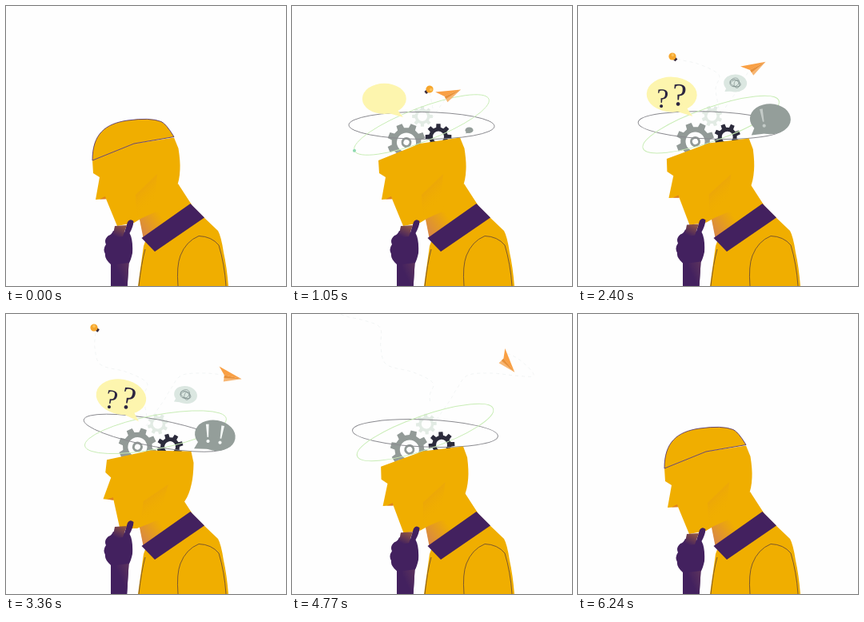
These frames come from a looping animation (350 px wide and 350 px high, 6.27 s). An HTML page:

```html
<!DOCTYPE html>
<html lang="en">
<head>
<meta charset="utf-8">
<title>Thinking</title>
<style>
  html, body { margin: 0; width: 100%; height: 100%; overflow: hidden; background: #fefefe; }
  svg { display: block; width: 100vw; height: 100vh; }
  text { font-family: "Liberation Serif", "Noto Serif", serif; text-anchor: middle; }
  .line { fill: none; stroke: #5f4238; stroke-width: .8; }
  .trail { fill: none; stroke: #eef1f1; stroke-width: .8; stroke-dasharray: 4 4; }
</style>
</head>
<body>
<svg viewBox="0 0 350 350">
  <defs>
    <linearGradient id="neckShade" gradientUnits="userSpaceOnUse" x1="168" y1="280" x2="194" y2="262">
      <stop stop-color="#d98844"/><stop offset="1" stop-color="#f0ae00"/>
    </linearGradient>
    <linearGradient id="cheekShade" gradientUnits="userSpaceOnUse" x1="166" y1="226" x2="184" y2="244">
      <stop stop-color="#e59a18" stop-opacity=".5"/><stop offset="1" stop-color="#f0ae00" stop-opacity="0"/>
    </linearGradient>
    <linearGradient id="thumbShade" gradientUnits="userSpaceOnUse" x1="150" y1="272" x2="141" y2="290">
      <stop stop-color="#a0603f"/><stop offset="1" stop-color="#43215f"/>
    </linearGradient>
    <linearGradient id="armShade" gradientUnits="userSpaceOnUse" x1="139" y1="330" x2="156" y2="322">
      <stop stop-color="#43215f"/><stop offset="1" stop-color="#5f355d"/>
    </linearGradient>
  </defs>

  <path id="bulbTrail" class="trail"/>
  <path id="planeTrail" class="trail"/>

  <path fill="url(#neckShade)" d="M166 262L215 222 233 250 190 296 172 292Z"/>

  <g id="head">
    <g id="gears">
      <g id="lightGear" fill="#e2ebe4"></g>
      <g id="bigGear" fill="#929a97"></g>
      <g id="darkGear" fill="#2c2b3c"></g>
    </g>
    <g id="darkOrbit" fill="none" stroke="#8b8b90">
      <ellipse cx="162" cy="149.500" rx="91" ry="17" transform="rotate(.5 162 149.500)" vector-effect="non-scaling-stroke"/>
    </g>
    <g id="greenOrbit" fill="none" stroke="#c9edb6">
      <ellipse cx="162" cy="148.500" rx="90" ry="21" transform="rotate(-21 162 148.500)" vector-effect="non-scaling-stroke"/>
    </g>
    <circle id="greenDot" r="2" fill="#8fd9b0"/>
    <circle id="purpleDot" r="2" fill="#9a88b8"/>
    <path fill="#f0ae00" d="M108 193L160 172 210 164.500 215.500 178Q218 194 217.500 204Q217 218 213 227L190 256 170 265 160 271 139 275 125 241 112 242 117 214 109 209Z"/>
    <path fill="url(#cheekShade)" d="M189 210L162 236 163 262 185 250Z"/>
    <path fill="#d8702c" opacity=".7" d="M117 241.500L124 238 125 241.500Z"/>
    <path id="lid" fill="#f0ae00" stroke="#5a3a78" stroke-width=".9" stroke-linejoin="round"
      d="M108 193C108 160 124 147 152 143Q180 139 194 144.500Q200 147 210 163.500L160 172Z"/>
    <g id="paleBubble">
      <path fill="#dbe7e1" d="M178 107L182 97 190 106Z"/>
      <ellipse cx="191" cy="96" rx="14.500" ry="11" fill="#dbe7e1"/>
      <g fill="none" stroke="#869693" stroke-width=".7">
        <ellipse cx="191" cy="96" rx="7" ry="4" transform="rotate(20 191 96)"/>
        <ellipse cx="190" cy="95" rx="5" ry="6" transform="rotate(50 190 95)"/>
        <ellipse cx="193" cy="97" rx="3.500" ry="5"/>
        <path d="M184 97Q190 88 195 95T188 100"/>
      </g>
    </g>
    <g id="yellowBubble" fill="#fdf5ae">
      <path d="M139 139L114 132 129 126Z"/>
      <ellipse cx="112" cy="112.500" rx="31.500" ry="22"/>
      <g id="ask1"><text transform="translate(100.500 118) rotate(2)" y="11" font-size="34" fill="#2c2540">?</text></g>
      <g id="ask2"><text transform="translate(121.500 113) rotate(2)" y="13" font-size="40" fill="#2c2540">?</text></g>
    </g>
    <g id="grayBubble" fill="#949e9a">
      <path d="M213 160.500L218 147 236 157Z"/>
      <ellipse cx="236" cy="139.500" rx="25.500" ry="19"/>
      <text id="bang1" transform="translate(226.500 139) rotate(-12)" y="11" font-size="35" fill="#f4f8f6">!</text>
      <text id="bang2" transform="translate(243.500 138) rotate(0)" y="11" font-size="35" fill="#f4f8f6">!</text>
    </g>
  </g>

  <path fill="#f0ae00" d="M172 300L165 350H278Q276 326 272 308Q269 288 265 281L245 262 233 250 215 224 190 250Z"/>
  <path fill="url(#neckShade)" d="M168 267L190 257 210 262 174 290Z"/>
  <path class="line" d="M174 304Q169 322 166 350M215 350Q213 325 218 312Q225 294 241 287.500Q257 288 266 299Q273 322 275 350"/>
  <path fill="#43215f" d="M169.500 290L230.500 247 248 264.500 186 307Z"/>

  <g id="hand">
    <path fill="#43215f" d="M152 270Q155 265 159.500 269Q159 276 154.500 284Q159 292 158 309Q156 318 153.500 322L150.500 370H131V323Q123 316 124 310Q120.500 304 125 298Q122 292 128 287Q132 286 134 281L148 283Z"/>
    <path fill="url(#thumbShade)" d="M136 275L151 274 146 288 133 290Z"/>
    <path fill="url(#armShade)" d="M138 323L153.500 321 150.500 370H138Z"/>
  </g>

  <g id="bulb">
    <path fill="#3a2b3c" d="M3.500 -2H7V2H3.500Z"/>
    <circle r="4.600" fill="#f6a62c"/>
    <circle cx="-1" cy="-1.500" r="1.800" fill="#fbc25a"/>
  </g>
  <g id="plane">
    <path fill="#f9a045" d="M16 0L-15 -8 -6 1Z"/>
    <path fill="#f7b673" d="M16 0L-6 1 -5 9Z"/>
    <path fill="#e8913a" d="M16 0L-6 1 -5.500 4.500Z"/>
  </g>
</svg>
<script>
const LOOP = 6270;
const $ = id => document.getElementById(id);
const ramp = (t, a, b) => Math.min(1, Math.max(0, (t - a) / (b - a)));
const ease = (t, a, b) => { const u = ramp(t, a, b); return u * u * (3 - 2 * u); };
// rises over a..b, falls over c..d
const pulse = (t, a, b, c, d) => ease(t, a, b) - ease(t, c, d);
const move = (id, value) => $(id).setAttribute("transform", value);
const fade = (id, value) => $(id).setAttribute("opacity", value);
const grow = (id, s, x, y) => {
  move(id, `translate(${x} ${y}) scale(${s}) translate(${-x} ${-y})`);
  fade(id, s > .01 ? 1 : 0);
};

function gear(id, n, outer, root, hole, hub) {
  let d = "";
  const step = 2 * Math.PI / n;
  for (let i = 0; i < n; i++)
    [[root, -.3], [outer, -.2], [outer, .2], [root, .3]].forEach(([r, k]) => {
      const a = (i + k) * step;
      d += (d ? "L" : "M") + (r * Math.cos(a)).toFixed(2) + " " + (r * Math.sin(a)).toFixed(2);
    });
  const ring = r => `M${r} 0A${r} ${r} 0 1 0 ${-r} 0A${r} ${r} 0 1 0 ${r} 0Z`;
  d += "Z" + ring(hole) + (hub ? ring(hub) + ring(hub * .55) : "");
  $(id).innerHTML = `<path fill-rule="evenodd" d="${d}"/>`;
}
gear("bigGear", 8, 24, 18.500, 12, 6.500);
gear("lightGear", 8, 13, 9.500, 6);
gear("darkGear", 8, 16.500, 12, 7);

// time, x, y, angle
const bulbKeys = [
  [800, 176, 128, 150], [1050, 172, 104, 140], [1500, 176, 86, 110], [1890, 152, 73, 80],
  [2400, 118, 63, 45], [2800, 111, 42, 40], [3360, 110, 17, 35],
  [3780, 90, 8, 28], [4170, 65, 2, 20], [4450, 46, -8, 20]
];
const planeKeys = [
  [700, 175, 140, -35], [1050, 196, 110, -20], [1900, 207, 92, -30], [2400, 220, 76.5, -25],
  [2900, 250, 74, 0], [3360, 279, 77, 15], [3750, 302, 77, -55], [4170, 288, 60, -137],
  [4500, 270, 50, -190], [4700, 266, 57, -270], [4850, 274, 62, -345], [5040, 287, 57, -390],
  [5280, 300, 46, -402], [5670, 305, 38, -420], [6050, 306, 17, -440]
];

// smooth curve through the keys
function at(keys, t) {
  const last = keys.length - 1;
  t = Math.min(keys[last][0], Math.max(keys[0][0], t));
  let i = 0;
  while (i < last - 1 && t > keys[i + 1][0]) i++;
  const a = keys[i], b = keys[i + 1], p = keys[Math.max(0, i - 1)], n = keys[Math.min(last, i + 2)];
  const h = b[0] - a[0], u = (t - a[0]) / h, w = u * u * (3 - 2 * u);
  return [1, 2, 3].map(k => {
    const ma = (b[k] - p[k]) / (b[0] - p[0]) * h, mb = (n[k] - a[k]) / (n[0] - a[0]) * h;
    return a[k] * (1 - w) + b[k] * w + ma * u * (1 - u) ** 2 - mb * u * u * (1 - u);
  });
}

function fly(id, keys, t, eraseFrom, eraseTo, fadeAt) {
  const start = keys[0][0], end = keys[keys.length - 1][0];
  const [x, y, angle] = at(keys, t);
  move(id, `translate(${x} ${y}) rotate(${angle})`);
  fade(id, ramp(t, start, start + 200) * (1 - ramp(t, fadeAt, end)));
  const from = start + (end - start) * ramp(t, eraseFrom, eraseTo) ** 2;
  const points = [];
  for (let s = from; s < Math.min(t, end); s += 30) points.push(at(keys, s).slice(0, 2).join(" "));
  $(id + "Trail").setAttribute("d", points.length > 1 ? "M" + points.join("L") : "");
}

function orbitDot(id, cy, rx, ry, tilt, phase, opacity) {
  const x = rx * Math.cos(phase), y = ry * Math.sin(phase);
  move(id, `translate(162 ${cy}) rotate(${tilt}) translate(${x} ${y})`);
  fade(id, opacity);
}

function draw(t) {
  const nod = pulse(t, 2050, 3400, 3750, 5150);
  move("head", `rotate(${10 * nod} 179 291)`);
  move("hand", `translate(0 ${-9 * nod})`);

  const open = pulse(t, 30, 720, 5020, 5700);
  move("lid", `translate(${-38 * open} ${-96 * open})`);
  fade("lid", 1 - ramp(t, 450, 720) + ramp(t, 5020, 5300));
  $("lid").setAttribute("stroke-opacity", 1 - .6 * open);

  const up = pulse(t, 200, 750, 5170, 5600);
  move("gears", `translate(0 ${30 * (1 - up)})`);
  fade("gears", up > .01 ? 1 : 0);
  const spin = (t - 1050) / 30;
  move("bigGear", `translate(143 170.500) rotate(${22.5 + spin})`);
  move("lightGear", `translate(163 138) rotate(${-spin * 1.5})`);
  move("darkGear", `translate(183 163.500) rotate(${-spin * 1.5})`);

  grow("darkOrbit", pulse(t, 400, 950, 5060, 5540), 162, 165);
  grow("greenOrbit", pulse(t, 400, 1000, 4900, 5400), 162, 148);
  orbitDot("greenDot", 148.5, 90, 21, -21, Math.PI + (t - 1050) * .002, pulse(t, 700, 900, 1200, 1350));
  orbitDot("purpleDot", 149.5, 91, 17, .5, -1.05 + (t - 4170) * .002, pulse(t, 3850, 4000, 4350, 4500));

  grow("yellowBubble", pulse(t, 600, 1180, 3940, 4400), 138, 139);
  grow("ask1", ease(t, 1300, 1550), 100, 127);
  grow("ask2", ease(t, 1550, 1800), 121, 124);
  grow("grayBubble", pulse(t, 900, 1430, 4050, 4480), 218, 159);
  fade("bang1", ramp(t, 2250, 2550));
  fade("bang2", ramp(t, 2550, 2850));
  grow("paleBubble", pulse(t, 1300, 1750, 4140, 4600), 178, 107);

  fly("bulb", bulbKeys, t, 4500, 5700, 4440);
  fly("plane", planeKeys, t, 4700, 5950, 5800);
}

const begin = performance.now();
function tick() {
  const t = (performance.now() - begin) % LOOP;
  draw(Math.floor(t / 30) * 30);
  requestAnimationFrame(tick);
}
tick();
</script>
</body>
</html>
```
